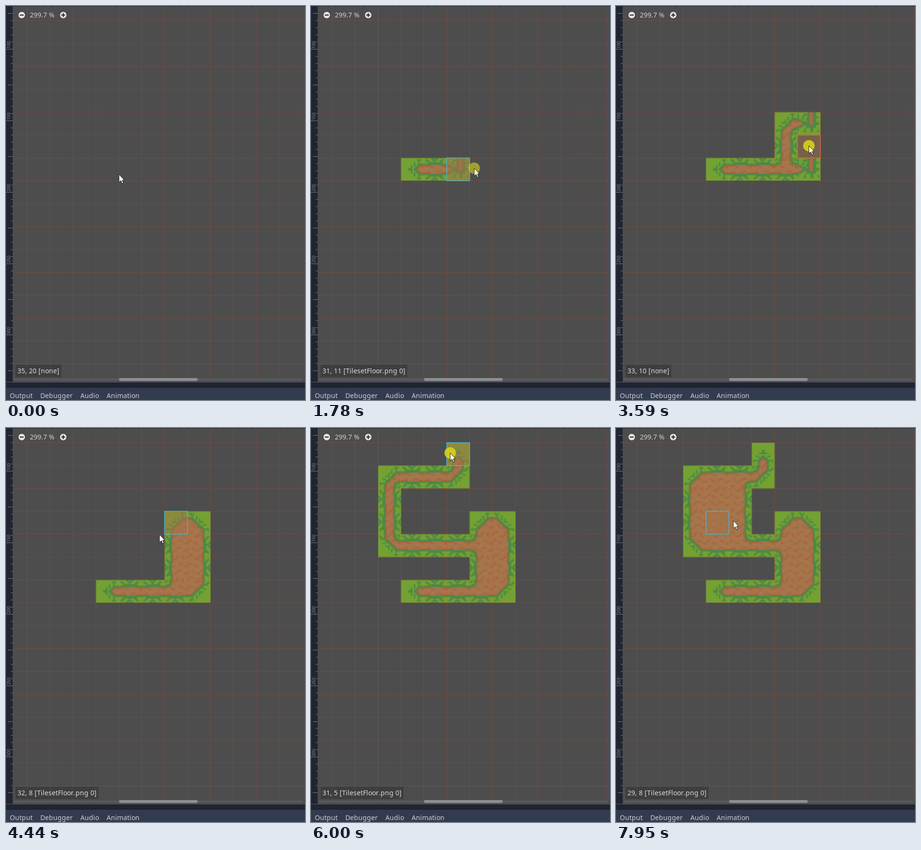
These frames come from a looping animation (627 px wide and 826 px high, 8 s). An HTML page with a canvas:

```html
<!DOCTYPE html>
<html lang="en">
<head>
<meta charset="utf-8">
<title>Tile painting</title>
<style>
  html, body { margin: 0; width: 100%; height: 100%; overflow: hidden; background: #4d4d4d; }
  canvas { display: block; }
</style>
</head>
<body>
<canvas id="stage" width="627" height="826"></canvas>
<script>
const ctx = document.getElementById('stage').getContext('2d');
const LOOP = 8000, CELL = 47.95, LEFT = 140.8, TOP = 30.75, COL = 28, ROW = 5, COLS = 6, ROWS = 7;
const DIRT = [166, 117, 75], CLAY = [164, 101, 63], GRASS = [115, 162, 50], LEAF = [77, 136, 71];
const STEP = { L: [-1, 0], R: [1, 0], U: [0, -1], D: [0, 1] };

// Each stroke paints its first cell, then walks on by the letters in go
const strokes = [
  { start: 850, end: 1600, up: 1730, cell: [29, 11], go: 'RR' },
  { start: 1860, end: 2000, up: 2030, cell: [32, 11], go: 'R' },
  { start: 2700, end: 2700, up: 2770, cell: [32, 10], go: '' },
  { start: 2980, end: 2980, up: 3030, cell: [32, 9], go: '' },
  { start: 3330, end: 3600, up: 3640, cell: [33, 9], go: 'D' },
  { start: 4030, end: 4270, up: 4280, cell: [33, 8], go: 'L' },
  { start: 4600, end: 5840, up: 6020, cell: [31, 9], go: 'LLLUUURRRU' },
  { start: 6520, end: 6740, up: 6770, cell: [29, 7], go: 'D' },
  { start: 7300, end: 7540, up: 7570, cell: [30, 7], go: 'D' }
];

// Places the pointer passes or waits at between strokes: from, to, x, y
const rests = [
  [0, 180, 237, 353], [590, 790, 213, 301], [1780, 1780, 342, 340], [2100, 2300, 404, 343],
  [2820, 2820, 371, 262], [3050, 3130, 354, 233], [4440, 4440, 322, 223], [6000, 6000, 292, 52],
  [6920, 7080, 210, 219], [7820, 7890, 220, 203], [7935, LOOP, 246, 194]
];

const paints = strokes.flatMap(({ start, end, cell, go }) => {
  let [c, r] = cell;
  const list = [{ t: start, c, r }];
  [...go].forEach((way, i) => {
    c += STEP[way][0];
    r += STEP[way][1];
    list.push({ t: start + (end - start) * (i + 1) / go.length, c, r });
  });
  return list;
});

const cellX = c => LEFT + (c - COL) * CELL;
const cellY = r => TOP + (r - ROW) * CELL;

const path = [
  ...paints.map(({ t, c, r }) => ({ t, x: cellX(c + .5), y: cellY(r + .5) })),
  ...rests.flatMap(([from, to, x, y]) => [{ t: from, x, y }, { t: to, x, y }])
].sort((a, b) => a.t - b.t);

function cursorAt(t) {
  const i = Math.max(1, path.findIndex(p => p.t >= t));
  const a = path[i - 1], b = path[i];
  const k = b.t > a.t ? (t - a.t) / (b.t - a.t) : 1;
  return [a.x + (b.x - a.x) * k, a.y + (b.y - a.y) * k];
}

const mod = (v, n) => ((v % n) + n) % n;

// Signed depth inside the dirt, plus a coordinate running along its edge
function dirtField(has, c, r, x, y) {
  const l = !has(c - 1, r), rt = !has(c + 1, r), t = !has(c, r - 1), b = !has(c, r + 1);
  if (rt && t && b && !l) {
    const root = 2.4 - Math.abs(y - 8) - x * .5;
    const stub = Math.min(1.2 - Math.abs(x - 9.7), 9 - y);
    return [Math.max(root, stub), x + y];
  }
  const wave = v => -.5 * Math.cos(v / 8 * Math.PI);
  const X = 16 - x, Y = 16 - y;
  let f = 9, s = 0;
  const put = (v, along) => { if (v < f) { f = v; s = along; } };
  if (l) put(x - 5 + wave(y), y);
  if (rt) put(X - 5 + wave(y), y);
  if (t) put(y - 5 + wave(x), x);
  if (b) put(Y - 5 + wave(x), x);
  const corner = (sideA, sideB, dc, dr, u, v) => {
    if (sideA && sideB) put((u + v - 19) / 1.4, u - v + 8);
    else if (!sideA && !sideB && !has(c + dc, r + dr)) put(Math.hypot(u, v) - 5.3, u - v + 8);
  };
  corner(l, t, -1, -1, x, y);
  corner(rt, t, 1, -1, X, y);
  corner(l, b, -1, 1, x, Y);
  corner(rt, b, 1, 1, X, Y);
  return [f, s];
}

function texel(has, c, r, x, y) {
  const [f, s] = dirtField(has, c, r, x + .5, y + .5);
  if (f >= 0) {
    const ripple = mod(y + Math.round(.8 * Math.sin(x * Math.PI / 4)), 5) === 0 && mod(x * 3 + y, 16) < 11;
    return ripple || f < .5 ? CLAY : DIRT;
  }
  const lean = s < 8 ? .9 : -.9;
  const twig = f > -4.6 && mod(s - f * lean, 4.6) < 1.7;
  return f > -1.7 || twig ? LEAF : GRASS;
}

const map = document.createElement('canvas');
map.width = COLS * 16;
map.height = ROWS * 16;
const mapCtx = map.getContext('2d');
let drawnCount = -1;

function updateMap(t) {
  const done = paints.filter(p => p.t <= t);
  if (done.length === drawnCount) return;
  drawnCount = done.length;
  const keys = new Set(done.map(p => p.c + ',' + p.r));
  const has = (c, r) => keys.has(c + ',' + r);
  const img = mapCtx.createImageData(map.width, map.height);
  for (const { c, r } of done)
    for (let y = 0; y < 16; y++)
      for (let x = 0; x < 16; x++) {
        const i = (((r - ROW) * 16 + y) * map.width + (c - COL) * 16 + x) * 4;
        img.data.set([...texel(has, c, r, x, y), 255], i);
      }
  mapCtx.putImageData(img, 0, 0);
}

function rect(color, x, y, w, h) {
  ctx.fillStyle = color;
  ctx.fillRect(x, y, w, h);
}

// Whole-pixel advances, as in a hinted interface font; returns the end x
function text(str, x, y, color = '#cdcfd2') {
  ctx.font = '14px "Noto Sans", sans-serif';
  ctx.fillStyle = color;
  for (const ch of str) {
    ctx.fillText(ch, x, y);
    x += Math.round(ctx.measureText(ch).width);
  }
  return x;
}

function drawGrid() {
  const red = 'rgba(220,70,30,.25)', gray = 'rgba(255,255,255,.05)';
  for (let k = 0; k < 13; k++)
    rect(k >= 5 ? red : gray, Math.floor(cellX(COL - 2 + k)), 0, 1, 780);
  for (let k = 0; k < 16; k++)
    rect(k <= 13 ? red : gray, 15, Math.floor(cellY(ROW + k)), 610, 1);
}

// The highlight trails the pointer a little; returns the status text
function drawHover(t) {
  if (t < 240) return '35, 20 [none]';
  const [px, py] = cursorAt(t - 60);
  const c = COL + Math.floor((px - LEFT) / CELL), r = ROW + Math.floor((py - TOP) / CELL);
  const used = paints.some(p => p.t <= t - 150 && p.c === c && p.r === r);
  const x = cellX(c), y = cellY(r);
  rect('rgba(166,117,75,.5)', x, y, CELL, CELL);
  ctx.strokeStyle = used ? '#4cb2cf' : '#dc6a3a';
  ctx.lineWidth = 1.5;
  ctx.strokeRect(x, y, CELL, CELL);
  return `${c}, ${r} [${used ? 'TilesetFloor.png 0' : 'none'}]`;
}

function drawZoomButton(x, plus) {
  ctx.beginPath();
  ctx.arc(x, 19, 7.5, 0, Math.PI * 2);
  ctx.fillStyle = '#e0e0e0';
  ctx.fill();
  ctx.strokeStyle = '#2b2b2b';
  ctx.lineWidth = 1;
  ctx.stroke();
  rect('#222', x - 4, 18, 8, 2);
  if (plus) rect('#222', x - 1, 15, 2, 8);
}

function drawRulers() {
  const tick = '#777b84', gap = 14.985;
  rect('#202531', 0, 0, 14, 788);
  rect('#202531', 14, 0, 613, 1);
  for (let x = 28; x < 627; x += gap) rect(tick, Math.round(x), 0, 1, 1);
  for (let k = 0; k < 51; k++) {
    const w = k % 10 === 5 ? 14 : k % 10 === 0 ? 10 : 4;
    rect(tick, 14 - w, Math.round(15.1 + k * gap), w, 1);
  }
  ctx.font = '9px "Noto Sans", sans-serif';
  ctx.fillStyle = '#858992';
  for (let k = 0; k < 5; k++) {
    ctx.save();
    ctx.translate(9, 89 + k * gap * 10);
    ctx.rotate(-Math.PI / 2);
    ctx.fillText(100 + k * 50, 0, 0);
    ctx.restore();
  }
}

function drawPanel(label) {
  rect('#5a5a5a', 16, 781, 606, 4);
  ctx.fillStyle = '#8f8f8f';
  ctx.beginPath();
  ctx.roundRect(237, 780, 165, 6, 3);
  ctx.fill();
  const end = text(label, 24, 770, 'transparent');
  rect('rgba(0,0,0,.2)', 20, 752, end - 16, 26);
  text(label, 24, 770, '#dadada');
  rect('#202531', 0, 788, 627, 12);
  rect('#565b66', 0, 788, 627, 1);
  rect('#333b4f', 0, 800, 627, 26);
  rect('#171b24', 0, 799, 627, 1);
  let x = 8;
  for (const tab of ['Output', 'Debugger', 'Audio', 'Animation']) x = text(tab, x, 822) + 16;
}

function pressAlpha(t) {
  const s = strokes.find(s => t >= s.start - 30 && t < s.up + 160);
  return s ? .9 * Math.min(1, 1 - (t - s.up) / 160) : 0;
}

const arrow = new Path2D('M0 0V16.5L4 13L6.6 19.2L9.2 18.1L6.6 12.2H11.2Z');

function drawCursor(t) {
  const [x, y] = cursorAt(t), a = pressAlpha(t);
  ctx.save();
  ctx.translate(x, y);
  if (a > 0) {
    ctx.fillStyle = `rgba(214,208,26,${a})`;
    ctx.beginPath();
    ctx.arc(0, 0, 12, 0, Math.PI * 2);
    ctx.fill();
  }
  ctx.fillStyle = a > 0 ? '#ffffd8' : '#fff';
  ctx.fill(arrow);
  ctx.strokeStyle = '#1c1c1c';
  ctx.lineWidth = 1;
  ctx.stroke(arrow);
  ctx.restore();
}

function draw(t) {
  rect('#4d4d4d', 0, 0, 627, 826);
  updateMap(t);
  ctx.drawImage(map, LEFT, TOP, COLS * CELL, ROWS * CELL);
  drawGrid();
  const label = drawHover(t);
  drawZoomButton(33, false);
  drawZoomButton(120, true);
  text('299.7 %', 50, 24, '#cfcfcf');
  drawRulers();
  drawPanel(label);
  drawCursor(t);
}

const start = performance.now();
function tick() {
  draw((performance.now() - start) % LOOP);
  requestAnimationFrame(tick);
}
tick();
</script>
</body>
</html>
```
